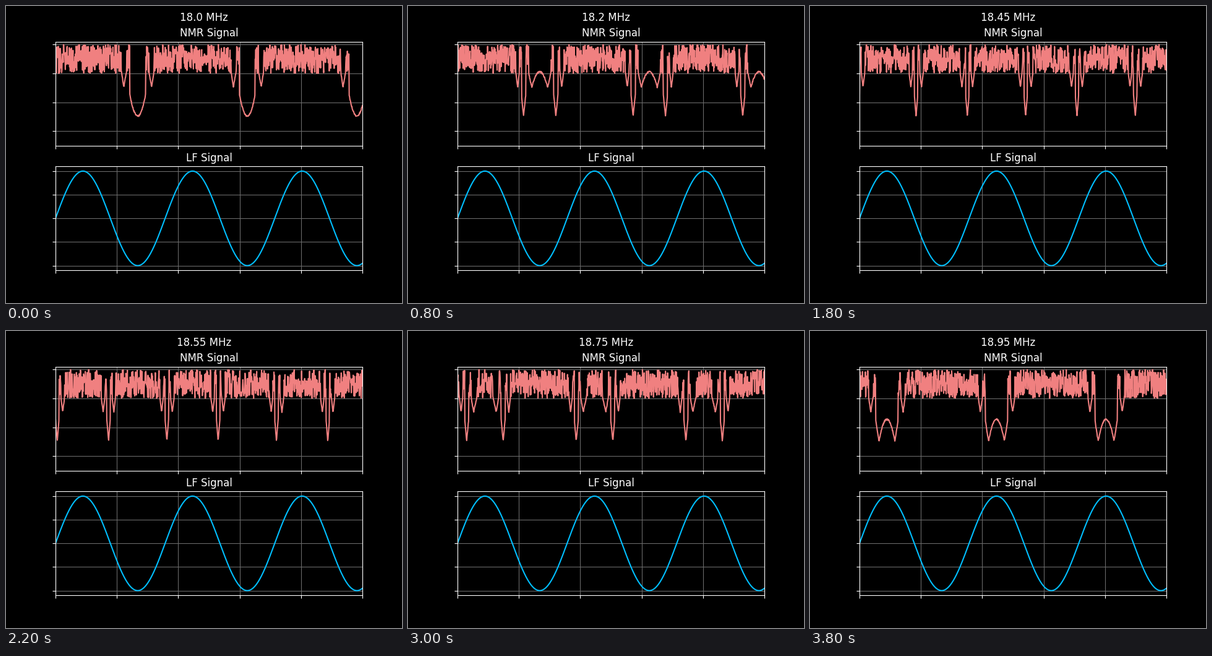
These frames come from a looping animation (640 px wide and 480 px high, 4000 ms). A matplotlib script:

```python
import numpy as np
import matplotlib.pyplot as plt
from matplotlib.animation import FuncAnimation

FRAMES = 20
INTERVAL = 200
SAMPLES = 1000
F_START, F_STEP = 18.0, 0.05
F_MID, F_SWING = 18.5, 0.5
SIDE_SHIFT = 0.15
HALF_WIDTH = 0.05

plt.style.use("dark_background")

t = np.linspace(0, 5, SAMPLES)
sweep = np.sin(2 * np.pi * 2.8 * t / 5)
resonance = F_MID + F_SWING * sweep


def dip(detuning, edge, depth):
    """V-shaped absorption line, `edge` at its rim and `edge - depth` at its tip."""
    return edge - depth * (1 - np.abs(detuning) / HALF_WIDTH)


def nmr_signal(freq, rng):
    signal = rng.uniform(-1, 0, SAMPLES)
    ripple = rng.uniform(0, 0.05, SAMPLES)
    main = np.abs(freq - resonance)
    side = main - SIDE_SHIFT
    eps = 1e-9
    lines = ((side, -0.97, 0.53), (main, -1.75, 0.75))
    for detuning, edge, depth in lines:
        inside = np.abs(detuning) <= HALF_WIDTH + eps
        signal[inside] = (dip(detuning, edge, depth) + ripple)[inside]
    return signal


def style_axes(ax, title, ylim, yticks):
    ax.set_title(title)
    ax.set_xlim(0, 5)
    ax.set_ylim(*ylim)
    ax.set_xticks(range(6))
    ax.set_yticks(yticks)
    ax.tick_params(labelbottom=False, labelleft=False)
    ax.grid(color="dimgray")


fig, (ax_nmr, ax_lf) = plt.subplots(2, 1, figsize=(6.4, 4.8), dpi=100)
style_axes(ax_nmr, "NMR Signal", (-3.5, 0.1), [-3, -2, -1, 0])
style_axes(ax_lf, "LF Signal", (-1.1, 1.1), [-1, -0.5, 0, 0.5, 1])

header = fig.suptitle("")
nmr_line, = ax_nmr.plot([], [], color="lightcoral")
ax_lf.plot(t, sweep, color="deepskyblue")


def update(i):
    freq = round(F_START + F_STEP * i, 2)
    header.set_text(f"{freq} MHz")
    nmr_line.set_data(t, nmr_signal(freq, np.random.default_rng(i)))
    return header, nmr_line


anim = FuncAnimation(fig, update, frames=FRAMES, interval=INTERVAL,
                     repeat=True, repeat_delay=0, blit=False)
plt.show()
```
